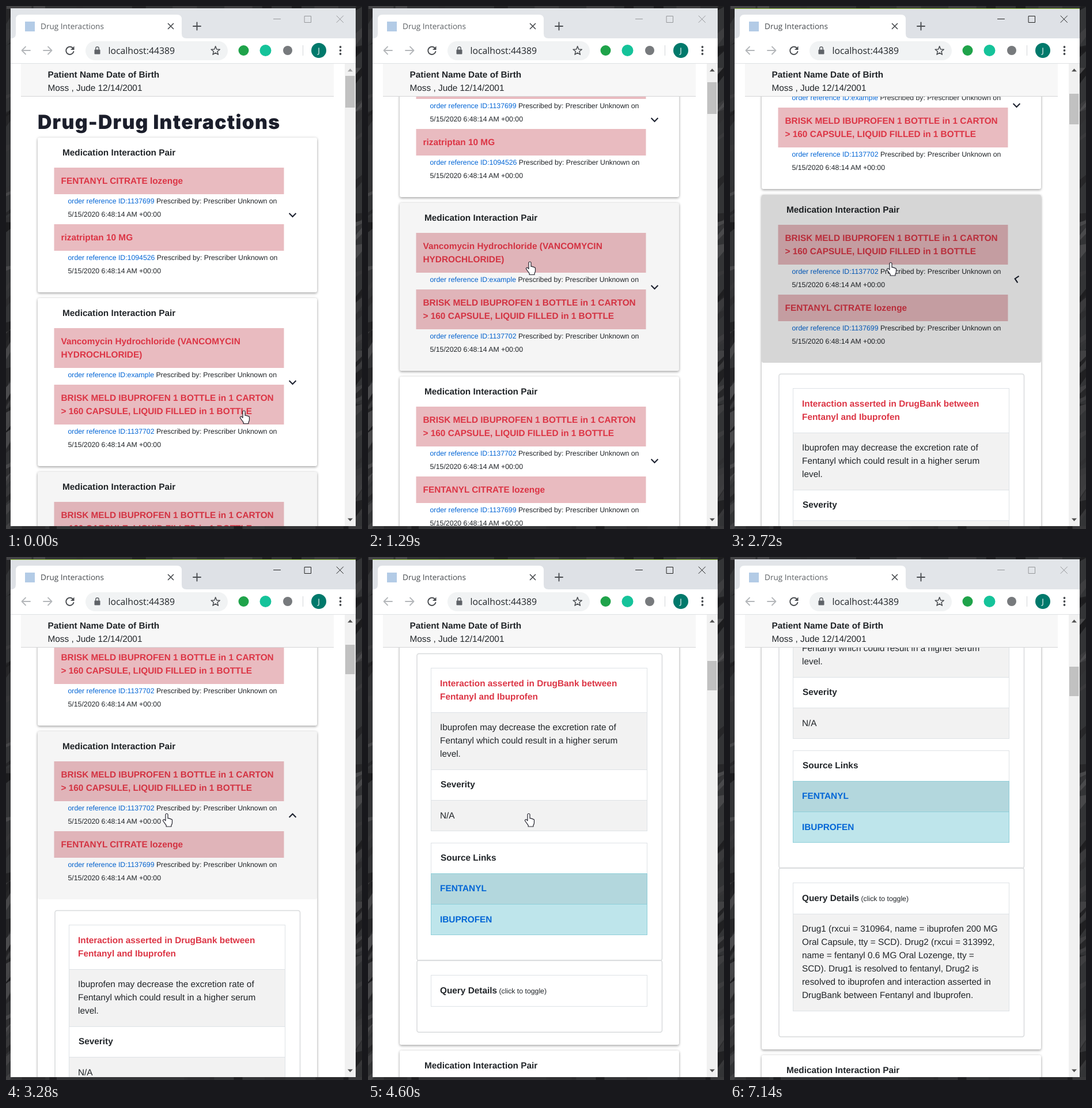
Recreate the animation shown at these times as an HTML page. Size 618x906 px, loop 7.24 s.

```html
<!DOCTYPE html>
<html lang="en">
<head>
<meta charset="utf-8">
<title>Drug Interactions</title>
<style>
html, body { margin: 0; width: 100%; height: 100%; overflow: hidden; background: #2a2b2d; }
svg { display: block; width: 100%; height: 100%; }
text { font: 15.36px "Liberation Sans", Arial, sans-serif; fill: #212529; text-rendering: geometricPrecision; white-space: pre; }
.b { font-weight: 700; }
.red { fill: #dc3545; }
.link { fill: #0366d6; }
.small { font-size: 12.29px; }
.ui { font-family: "Open Sans", "Noto Sans", sans-serif; }
.h1 { font: 900 33.8px Inter, "Open Sans", sans-serif; letter-spacing: 1.2px; fill: #1b1e2b; }
.card { filter: drop-shadow(0 2px 2px rgba(0,0,0,.28)) drop-shadow(0 0 2px rgba(0,0,0,.13)); }
.line { fill: none; stroke-linecap: round; stroke-linejoin: round; }
.chevron { fill: none; stroke: #1d2230; stroke-width: 2.1; }
</style>
</head>
<body>
<svg id="stage" viewBox="0 0 618 906" preserveAspectRatio="none">
  <defs>
    <clipPath id="pageClip"><rect x="8" y="99" width="580" height="802"/></clipPath>
    <clipPath id="bodyClip"><rect id="bodyMask" x="40" width="520"/></clipPath>
    <clipPath id="queryClip"><rect id="queryMask" x="100" width="400"/></clipPath>
  </defs>
  <g id="rock"></g>
  <rect x="8" y="4" width="599" height="897" fill="#fff"/>
  <g clip-path="url(#pageClip)"><g id="doc"></g></g>
  <g id="chrome"></g>
  <path id="hand" fill="#fff" stroke="#25252f" stroke-width="1.2" stroke-linejoin="round"
    d="M-2 2a2 2 0 0 1 4 0v6.3l.8-.2a1.7 1.7 0 0 1 2 .9 1.7 1.7 0 0 1 2.5.9 1.6 1.6 0 0 1 2.2 1.6v4.6q0 2-1.6 4.2v2.2h-8.7v-2.2l-5.3-7.3a1.7 1.7 0 0 1 2.5-2.3l1.6 1.6z"/>
</svg>
<script>
const LOOP = 7240, LINE = 23.04, CELL_PAD = 30.2, GAP = 9.6;
const BODY = 696.5, QUERY = 6 * LINE + CELL_PAD;
const $ = id => document.getElementById(id);
const px = Math.round;
const hairline = y => Math.floor(y) + .5;

function el(tag, attrs, parent, text) {
  const node = document.createElementNS('http://www.w3.org/2000/svg', tag);
  set(node, attrs);
  if (text !== undefined) node.textContent = text;
  parent.appendChild(node);
  return node;
}
function set(node, attrs) {
  for (const k in attrs) node.setAttribute(k, attrs[k]);
}
const rect = (p, x, y, width, height, fill, more) => el('rect', { x, y, width, height, fill, ...more }, p);
const label = (p, x, y, text, cls = '') => el('text', { x, y: px(y), class: cls }, p, text);
const stroke = (p, d, color, width = 1.5) => el('path', { d, stroke: color, 'stroke-width': width, class: 'line' }, p);
const dot = (p, cx, cy, r, fill) => el('circle', { cx, cy, r, fill }, p);

// Dark stone desktop behind the window
function drawRock() {
  const g = $('rock');
  let seed = 7;
  const rnd = () => (seed = seed * 16807 % 2147483647) / 2147483647;
  const grey = () => {
    const v = 28 + Math.floor(rnd() * 48);
    return `rgb(${v},${v},${v + 2})`;
  };
  rect(g, 0, 0, 618, 906, '#333436');
  for (let i = 0; i < 90; i++) {
    const side = i % 2 ? 607 : 0, y = rnd() * 906, h = 8 + rnd() * 30;
    el('path', { d: `M${side} ${y}l11 ${-rnd() * 14}v${h * .5}l-11 ${h * .5}z`, fill: grey() }, g);
  }
  for (let i = 0; i < 24; i++) rect(g, rnd() * 618, i % 2 ? 901 : 0, 10 + rnd() * 40, 5, grey());
}

// Drugs: [name lines, order id, has date line]
const ibuprofen = [['BRISK MELD IBUPROFEN 1 BOTTLE in 1 CARTON', '> 160 CAPSULE, LIQUID FILLED in 1 BOTTLE'], '1137702', true];
const fentanyl = [['FENTANYL CITRATE lozenge'], '1137699', true];
const rizatriptan = [['rizatriptan 10 MG'], '1094526', true];
const vancomycin = [['Vancomycin Hydrochloride (VANCOMYCIN', 'HYDROCHLORIDE)'], 'example', false];
const coldSyrup = [['Youngsters Dew Many-ailment Chill Peach With Lo'], '1137701', true];
const cards = [];

function addCard(top, drugs) {
  const g = el('g', {}, $('doc'));
  const back = rect(g, 55, px(top), 485, 0, '#fff', { rx: 3, class: 'card' });
  label(g, 98, top + 31, 'Medication Interaction Pair', 'b');
  let y = top + 52;
  for (const [names, id, dated] of drugs) {
    const end = y + (names.length + 1) * LINE;
    rect(g, 83.5, px(y), 399, px(end) - px(y), '#e9bbc0');
    names.forEach((s, i) => label(g, 95.5, y + 28 + i * LINE, s, 'b red'));
    const order = label(g, 107.5, end + 16.2, '', 'small');
    el('tspan', { class: 'link' }, order, 'order reference ID:' + id);
    el('tspan', {}, order, ' Prescribed by: Prescriber Unknown on');
    if (dated) label(g, 107.5, end + 16.2 + LINE, '5/15/2020 6:48:14 AM +00:00', 'small');
    y = end + 6 + LINE * (dated ? 2 : 1);
  }
  const height = y + 20 - top;
  const chevron = el('path', { d: 'M-5.9-3L0 2.9 5.9-3', class: 'chevron' }, g);
  const shade = rect(g, 55, px(top), 485, px(height), '#000', { rx: 3, opacity: 0 });
  cards.push({ g, back, chevron, shade, top, height });
  return top + height + GAP;
}

// A bordered table cell with text lines; returns the y below it
function cell(p, y, lines, { fill = '#fff', edge = '#dee2e6', cls = '', x = 125 } = {}) {
  const end = y + lines.length * LINE + CELL_PAD;
  rect(p, 109.5, hairline(y), 375, hairline(end) - hairline(y), fill, { stroke: edge });
  lines.forEach((s, i) => label(p, x, y + 31 + i * LINE, s, cls));
  return end;
}

let queryBox;
function addDetails(card) {
  const top = card.top + card.height;
  const g = el('g', { 'clip-path': 'url(#bodyClip)' }, card.g);
  const grey = { fill: '#f2f2f2' };
  set($('bodyMask'), { y: top });
  const box = (y, h) => rect(g, 85, hairline(y), 425.5, h, 'none', { rx: 3.5, stroke: '#d8dadc', 'stroke-width': 1.5 });
  box(top + 19, 531.5);
  let y = cell(g, top + 44.5, ['Interaction asserted in DrugBank between', 'Fentanyl and Ibuprofen'], { cls: 'b red' });
  y = cell(g, y, ['Ibuprofen may decrease the excretion rate of', 'Fentanyl which could result in a higher serum', 'level.'], grey);
  y = cell(g, y, ['Severity'], { cls: 'b', x: 126 });
  cell(g, y, ['N/A'], grey);
  y = cell(g, top + 346.8, ['Source Links'], { cls: 'b', x: 126 });
  y = cell(g, y, ['FENTANYL'], { fill: '#b3d7dd', edge: '#8fcfd9', cls: 'b link' });
  cell(g, y, ['IBUPROFEN'], { fill: '#bee5eb', edge: '#8fcfd9', cls: 'b link' });
  queryBox = box(top + 550.5, 124.8);
  y = cell(g, top + 576.6, ['']);
  const head = label(g, 125, top + 607.6, '');
  el('tspan', { class: 'b' }, head, 'Query Details');
  el('tspan', { class: 'small' }, head, ' (click to toggle)');
  const more = el('g', { 'clip-path': 'url(#queryClip)' }, g);
  set($('queryMask'), { y: y - 1 });
  cell(more, y, [
    'Drug1 (rxcui = 310964, name = ibuprofen 200 MG',
    'Oral Capsule, tty = SCD). Drug2 (rxcui = 313992,',
    'name = fentanyl 0.6 MG Oral Lozenge, tty =',
    'SCD). Drug1 is resolved to fentanyl, Drug2 is',
    'resolved to ibuprofen and interaction asserted in',
    'DrugBank between Fentanyl and Ibuprofen.'], grey);
}

let tabStrip, focusLine, controls, thumb, upArrow, tabTitle;
function drawChrome() {
  const g = $('chrome'), dark = '#4a4d51', pale = '#b4b7ba';
  tabStrip = rect(g, 8, 4, 599, 52, '#dee1e6');
  focusLine = rect(g, 8, 4, 599, 1, '#86b52c');
  el('path', { d: 'M9 56q8 0 8-8V23q0-8 8-8H297q8 0 8 8V48q0 8 8 8z', fill: '#fff' }, g);
  rect(g, 8, 56, 599, 43, '#fff');
  rect(g, 8, 99, 599, 1, '#dfe1e4');
  rect(g, 33, 27, 17, 17, '#b3cbe6');
  tabTitle = label(g, 60, 40, 'Drug Interactions', 'ui');
  tabTitle.style.fontSize = '13.6px';
  stroke(g, 'M281.5 30.5l9 9m0-9l-9 9', dark, 1.7);
  stroke(g, 'M331.5 28.5v13m-6.5-6.5h13', dark, 1.9);
  controls = el('g', {}, g);
  stroke(controls, 'M464.5 22.5h12M518.5 17.5h11v11h-11zM574 17l11.5 11.5m0-11.5l-11.5 11.5', 'currentColor', 1);

  stroke(g, 'M42 77H27.5m6.5-6.5l-6.5 6.5 6.5 6.5M65 77h14.5m-6.5-6.5l6.5 6.5-6.5 6.5', pale, 1.8);
  stroke(g, 'M116.5 73.500a6.7 6.7 0 1 0 .9 5.5', dark, 2);
  el('path', { d: 'M118.5 69.5v6.5h-6.5z', fill: dark }, g);
  rect(g, 138, 61, 247, 33, '#f1f3f4', { rx: 16.5 });
  rect(g, 153.5, 75.5, 10, 8, '#5f6368', { rx: 1 });
  stroke(g, 'M155.7 75.5v-2a2.75 2.75 0 0 1 5.5 0v2', '#5f6368', 1.5);
  label(g, 177.5, 83, 'localhost:44389', 'ui').style.fontSize = '15.8px';
  let star = '';
  for (let i = 0; i < 10; i++) {
    const r = i % 2 ? 3.4 : 8, a = i * Math.PI / 5;
    star += `${i ? 'L' : 'M'}${363.7 + r * Math.sin(a)} ${77.7 - r * Math.cos(a)}`;
  }
  stroke(g, star + 'z', dark, 1.5);
  dot(g, 412.5, 77, 9, '#1fa34a');
  dot(g, 450.5, 77, 10, '#15c39a');
  dot(g, 489, 77, 8, '#777a7d');
  rect(g, 515, 68, 1, 18, '#d3d6d9');
  dot(g, 543, 77, 13, '#00796b');
  set(label(g, 543, 82, 'J', 'ui'), { 'text-anchor': 'middle', style: 'fill:#fff;font-size:13.5px' });
  for (const y of [71, 77, 83]) dot(g, 580.5, y, 1.9, dark);

  rect(g, 26, 100, 543, 57, '#f7f7f7');
  rect(g, 26, 156, 543, 1, '#d4d5d6');
  label(g, 72.5, 124, 'Patient Name Date of Birth', 'b');
  label(g, 72.5, 147, 'Moss , Jude 12/14/2001');

  rect(g, 588, 100, 19, 801, '#f1f1f1');
  thumb = rect(g, 589, 121, 16.5, 54, '#c1c1c1');
  upArrow = el('path', { d: 'M593 113.5l4.5-5 4.5 5z' }, g);
  el('path', { d: 'M593 887.5l4.5 5 4.5-5z', fill: '#505050' }, g);
}

// Screen updates come in bursts: [first, last, count]
const bursts = [[0, 0, 1], [100, 390, 4], [610, 1070, 5], [1290, 1940, 7], [2070, 2160, 2], [2500, 2940, 5],
  [3280, 3590, 4], [3830, 4480, 7], [4600, 5260, 7], [5380, 6040, 7], [6160, 6690, 6], [7140, 7140, 1]];
const ticks = bursts.flatMap(([a, b, n]) =>
  Array.from({ length: n }, (_, i) => a + (n > 1 ? (b - a) * i / (n - 1) : 0)));
const snap = t => ticks.filter(k => k <= t + .01).pop();

// Piecewise linear track of [time, value] pairs
function track(keys, t) {
  let i = 0;
  while (i < keys.length - 1 && keys[i + 1][0] <= t) i++;
  const [t0, a] = keys[i], next = keys[i + 1];
  return next && t > t0 ? a + (next[1] - a) * (t - t0) / (next[0] - t0) : a;
}
const scrollKeys = [[540, 0], [610, 12], [725, 62], [840, 112], [955, 147], [1070, 160], [1200, 160], [1290, 165],
  [1940, 412], [2070, 465], [2160, 480], [3200, 480], [3280, 505], [3385, 575], [3490, 625], [3590, 640],
  [3830, 640], [3940, 680], [4370, 915], [4480, 942], [4600, 950], [5270, 950], [5380, 960], [5820, 1090], [6040, 1110]];
const handX = [[0, 413], [100, 398], [390, 281], [1290, 281], [1940, 279]];
const handY = [[0, 701], [100, 672], [390, 443], [1290, 443], [1940, 444.5], [6100, 444.5], [6372, 584]];
const openKeys = [[2605, 0], [2720, .56], [2830, .96], [2940, 1]];
const queryKeys = [[6400, 0], [6478, .3], [6584, .85], [6690, 1]];
const pressKeys = [[2490, .04], [2610, .12], [2720, .16], [2830, .1], [2940, .04]];

function render(now) {
  const t = snap(now % LOOP);
  const scroll = px(track(scrollKeys, t)), open = track(openKeys, t), query = px(QUERY * track(queryKeys, t));
  const x = track(handX, t), y = track(handY, t), focused = t >= 2500 && t < 7140;
  const extra = px(open * (BODY + query));

  set($('doc'), { transform: `translate(0 ${-scroll})` });
  cards.forEach((c, i) => {
    const third = i === 2, shift = i > 2 ? extra : 0, head = c.top + shift - scroll;
    const hover = t < 100 ? third : t < 7140 && y >= head && y <= head + c.height;
    set(c.g, { transform: `translate(0 ${shift})` });
    set(c.back, { height: px(c.height) + (third ? extra : 0) });
    set(c.shade, { opacity: hover ? (third ? track(pressKeys, t) : .04) : 0 });
    set(c.chevron, { transform: `translate(497.5 ${px(c.top + c.height / 2)}) rotate(${third ? open * 180 : 0})` });
  });
  set($('bodyMask'), { height: extra });
  set($('queryMask'), { height: query ? query + 2 : 0 });
  set(queryBox, { height: 124.8 + query });

  set(tabStrip, { fill: focused ? '#dee1e6' : '#e2e5e9' });
  set(focusLine, { opacity: focused ? 1 : 0 });
  set(controls, { color: focused ? '#222' : '#96989b' });
  tabTitle.style.fill = focused ? '#45494d' : '#5c6064';
  set(thumb, { y: px(121 + scroll * (.0655 - .0034 * open)), height: px(54.5 - 3.5 * open) });
  set(upArrow, { fill: scroll ? '#505050' : '#a3a3a3' });
  set($('hand'), { transform: `translate(${x} ${y})`, opacity: t < 7140 ? 1 : 0 });
}

drawRock();
label($('doc'), 55, 213, 'Drug-Drug Interactions', 'h1');
const pairs = [[fentanyl, rizatriptan], [vancomycin, ibuprofen], [ibuprofen, fentanyl], [rizatriptan, coldSyrup]];
pairs.reduce(addCard, 228);
addDetails(cards[2]);
drawChrome();

const start = performance.now();
function loop() {
  render(performance.now() - start);
  requestAnimationFrame(loop);
}
render(0);
requestAnimationFrame(loop);
</script>
</body>
</html>
```
